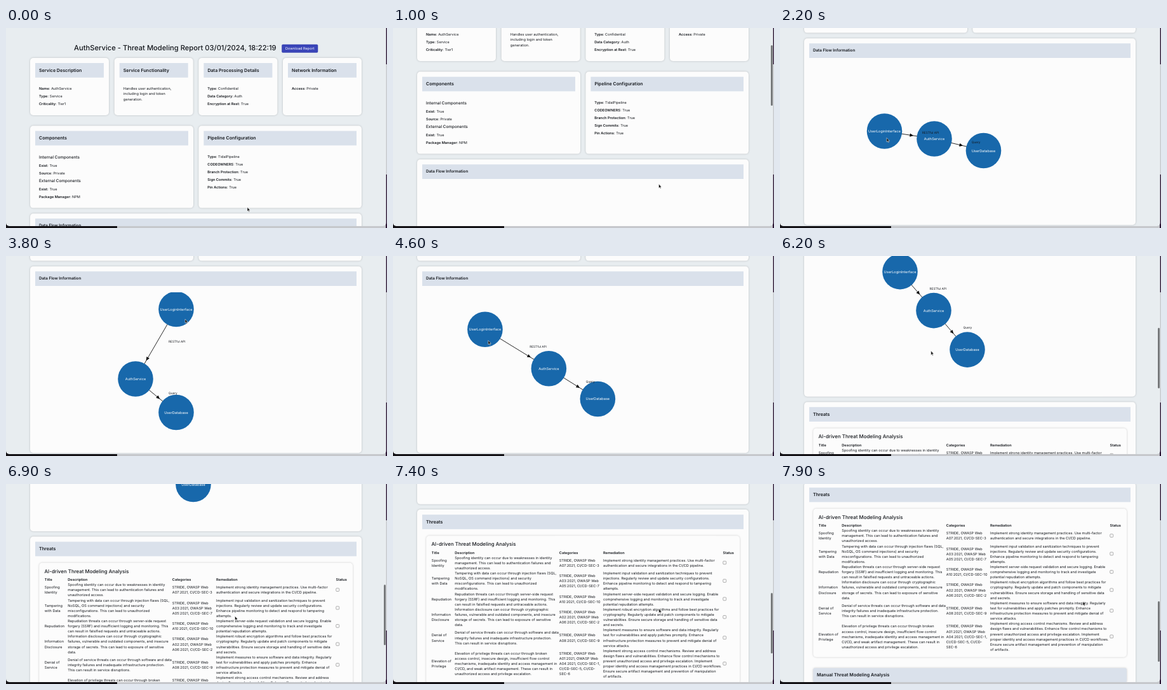
These frames come from a looping animation (600 by 314 pixels, 8 s). An HTML page:

```html
<!DOCTYPE html>
<html lang="en">
<head>
<meta charset="utf-8">
<title>Threat Modeling Report</title>
<style>
html, body { margin: 0; width: 100%; height: 100%; overflow: hidden; background: #e8edf0; }
svg { display: block; width: 600px; height: 314px; }
text { font-family: Inter, sans-serif; fill: #15181d; text-rendering: geometricPrecision; }
.card { fill: #fcfcfc; filter: drop-shadow(0 .8px 1.4px #0003); }
.bar { fill: #dae1eb; }
.node { fill: #1868ab; }
.box { fill: #fff; stroke: #777; stroke-width: .6; }
.mid { text-anchor: middle; fill: #fff; }
</style>
</head>
<body>
<svg viewBox="0 0 600 314">
  <clipPath id="window"><rect x="0" y="-20" width="598.6" height="331" rx="5"/></clipPath>
  <clipPath id="plot"><rect x="46" y="332" width="506" height="245"/></clipPath>
  <rect width="600" height="314" fill="#c6c8cc"/>
  <path d="M0 304H175V314H0Z" fill="#141216"/>
  <path d="M598 0H600V57H598ZM598 230H600V314H598Z" fill="#2c1634"/>
  <g clip-path="url(#window)">
    <rect width="600" height="314" fill="#e8edf0"/>
    <g id="page"><g id="report"></g><g id="graph" clip-path="url(#plot)"></g></g>
    <rect id="thumb" x="595" width="3" height="95" rx="1.5" fill="#777a7c"/>
  </g>
  <path id="cursor" d="M0 0V6.4L1.5 5.1L2.5 7.3L3.5 6.8L2.5 4.7H4.5Z" fill="#111" stroke="#fff" stroke-width=".5"/>
</svg>
<script>
const $ = id => document.getElementById(id);

// Text is placed by its left edge and the middle of its capitals.
const text = (x, y, str, size = 5.6, weight = 400, cls = '') =>
  `<text x="${x}" y="${y + size * .36}" font-size="${size}" font-weight="${weight}" class="${cls}">${str}</text>`;
const rect = (cls, x, y, w, h, r = 0) =>
  `<rect class="${cls}" x="${x}" y="${y}" width="${w}" height="${h}" rx="${r}"/>`;
const card = (x, y, w, h, title, size = 7.1) => rect('card', x, y, w, h, 5) +
  rect('bar', x + 8, y + 8, w - 16, 22.8) + text(x + 14, y + 19, title, size, 600);
const fields = (x, y, list) => list.map((s, i) =>
  text(x, y + i * 12, s.replace(/^[^:]+:/, '<tspan font-weight="600">$&</tspan>'))).join('');
const lines = (x, y, list, step = 8.12) => list.map((s, i) => text(x, y + i * step, s)).join('');

const threats = [
  ['Spoofing|Identity',
   'Spoofing identity can occur due to weaknesses in identity|management. This can lead to authentication failures and|unauthorized access.',
   'STRIDE, OWASP Web|A07:2021, CI/CD-SEC-3',
   'Implement strong identity management practices. Use multi-factor|authentication and secure integrations in the CI/CD pipeline.'],
  ['Tampering|with Data',
   'Tampering with data can occur through injection flaws (SQL,|NoSQL, OS command injections) and security|misconfigurations. This can lead to unauthorized|modifications.',
   'STRIDE, OWASP Web|A03:2021, OWASP Web|A05:2021, CI/CD-SEC-7',
   'Implement input validation and sanitization techniques to prevent|injections. Regularly review and update security configurations.|Enhance pipeline monitoring to detect and respond to tampering|attempts.'],
  ['Repudiation',
   'Repudiation threats can occur through server-side request|forgery (SSRF) and insufficient logging and monitoring. This|can result in falsified requests and untraceable actions.',
   'STRIDE, OWASP Web|A10:2021, CI/CD-SEC-10',
   'Implement server-side request validation and secure logging. Enable|comprehensive logging and monitoring to track and investigate|potential repudiation attempts.'],
  ['Information|Disclosure',
   'Information disclosure can occur through cryptographic|failures, vulnerable and outdated components, and insecure|storage of secrets. This can lead to exposure of sensitive|data.',
   'STRIDE, OWASP Web|A02:2021, OWASP Web|A06:2021, CI/CD-SEC-2',
   'Implement robust encryption algorithms and follow best practices for|cryptography. Regularly update and patch components to mitigate|vulnerabilities. Ensure secure storage and handling of sensitive data|and secrets.'],
  ['Denial of|Service',
   'Denial of service threats can occur through software and data|integrity failures and inadequate infrastructure protection.|This can result in service disruptions.',
   'STRIDE, OWASP Web|A08:2021, CI/CD-SEC-9',
   'Implement measures to ensure software and data integrity. Regularly|test for vulnerabilities and apply patches promptly. Enhance|infrastructure protection measures to prevent and mitigate denial of|service attacks.'],
  ['Elevation of|Privilege',
   'Elevation of privilege threats can occur through broken|access control, insecure design, insufficient flow control|mechanisms, inadequate identity and access management in|CI/CD, and weak artifact management. These can result in|unauthorized access and privilege escalation.',
   'STRIDE, OWASP Web|A01:2021, OWASP Web|A04:2021, CI/CD-SEC-1,|CI/CD-SEC-5, CI/CD-|SEC-6',
   'Implement strong access control mechanisms. Review and address|design flaws and vulnerabilities. Enhance flow control mechanisms to|prevent unauthorized access and privilege escalation. Implement|proper identity and access management practices in CI/CD workflows.|Ensure secure artifact management and prevention of manipulation|of artifacts.'],
];

function table() {
  const cols = [60.8, 97.3, 261.8, 331];
  let out = ['Title', 'Description', 'Categories', 'Remediation', 'Status']
    .map((s, i) => text(cols[i] ?? 519.5, 660, s, 5.6, 600)).join('');
  let top = 664.1;
  for (const row of threats) {
    const cells = row.map(s => s.split('|'));
    const height = 8.12 * Math.max(...cells.map(c => c.length));
    const mid = top + height / 2;
    cells.forEach((c, i) => out += lines(cols[i], mid - (c.length - 1) * 4.06, c));
    out += rect('box', 519.8, mid - 2.6, 4.8, 4.8, .9);
    top += height;
  }
  return out;
}

$('report').innerHTML =
  text(107, 30.5, 'AuthService - Threat Modeling Report 03/01/2024, 18:22:19', 11.2, 500) +
  '<rect x="434.5" y="26" width="56.5" height="12.5" rx="1.6" fill="#3a45b8" stroke="#2f3aa8" stroke-width=".5"/>' +
  text(462.8, 32.3, 'Download Report', 5.6, 400, 'mid') +
  card(38, 47, 124, 90, 'Service Description') +
  fields(52, 95.3, ['Name: AuthService', 'Type: Service', 'Criticality: Tier1']) +
  card(170.7, 47, 124, 90, 'Service Functionality') +
  lines(184.8, 95.3, ['Handles user authentication,', 'including login and token', 'generation.']) +
  card(303.4, 47, 124, 90, 'Data Processing Details') +
  fields(317.3, 95.3, ['Type: Confidential', 'Data Category: Auth', 'Encryption at Rest: True']) +
  card(436, 47, 124, 90, 'Network Information') +
  fields(450, 95.3, ['Access: Private']) +
  card(38, 153.6, 257, 129, 'Components') +
  text(52, 203, 'Internal Components', 6.4, 500) +
  fields(52, 215.5, ['Exist: True', 'Source: Private']) +
  text(52, 240, 'External Components', 6.4, 500) +
  fields(52, 253, ['Exist: True', 'Package Manager: NPM']) +
  card(303.4, 153.6, 256.6, 129, 'Pipeline Configuration') +
  fields(317.3, 202, ['Type: TidalPipeline', 'CODEOWNERS: True', 'Branch Protection: True', 'Sign Commits: True', 'Pin Actions: True']) +
  card(38, 291.2, 522, 293, 'Data Flow Information', 6.25) +
  card(38, 592.6, 522, 360, 'Threats') +
  rect('card', 52.3, 633.8, 493.7, 233, 5) +
  text(60.5, 647, 'AI-driven Threat Modeling Analysis', 7.9, 500) +
  table() +
  '<g class="card">' + rect('bar', 52.3, 884, 493.7, 22.8, 3) + '</g>' +
  text(58, 894.6, 'Manual Threat Modeling Analysis', 7.1, 600);

// Keys are [time, ...values], eased between neighbours.
function track(keys, t) {
  const i = keys.findIndex(k => k[0] > t);
  if (i < 1) return keys.at(i).slice(1);
  const a = keys[i - 1], b = keys[i];
  const p = (t - a[0]) / (b[0] - a[0]), e = p * p * (3 - 2 * p);
  return a.slice(1).map((v, j) => v + (b[j + 1] - v) * e);
}

const scroll = [[400, 0], [700, 85], [1000, 85], [1400, 275], [5700, 275], [6900, 510], [7900, 595]];
const pointer = [[400, 380, 281.5], [1000, 418.5, 245], [1600, 418, 245], [2200, 168, 172.5], [2500, 168, 172.5],
  [3800, 282, 99], [4400, 152, 134], [4900, 146, 130], [5500, 175.5, 114.5], [5800, 185, 124],
  [6900, 360.5, 207.5], [7900, 477, 184.5]];
// Centres of the three nodes: interface, service, database.
const layout = [
  [2400, 164.5, 162, 243, 174, 320.5, 192.5],
  [3800, 268, 83.5, 204, 193, 268, 245.5],
  [4400, 146, 117, 245, 176, 322, 222],
  [4900, 143, 112, 246, 178, 323, 229],
  [5500, 175.5, 98, 244.5, 181, 303, 243.5],
  [6100, 189, 113, 242, 174, 295, 235.5]];

const dy = 275;
function edge([x1, y1], [x2, y2]) {
  const turn = Math.atan2(y2 - y1, x2 - x1) * 180 / Math.PI;
  return `<path d="M${x1} ${y1}L${x2} ${y2}" stroke="#111" stroke-width=".9"/>` +
    `<path d="M-33.3 0l-5.6 -2.6v5.2z" fill="#000" transform="translate(${x2} ${y2}) rotate(${turn})"/>`;
}
const caption = (a, b, str) => text((a[0] + b[0]) / 2 + 20, (a[1] + b[1]) / 2 - 3.6, str, 4.75);

function drawGraph(t) {
  const v = track(layout, t);
  const nodes = [0, 2, 4].map(i => [v[i], v[i + 1] + dy]);
  const [ui, auth, db] = nodes;
  const names = ['UserLoginInterface', 'AuthService', 'UserDatabase'];
  $('graph').innerHTML = edge(ui, auth) + edge(auth, db) +
    nodes.map(([x, y], i) => `<circle class="node" cx="${x}" cy="${y}" r="27.8"/>` +
      text(x, y, names[i], 5.6, 400, 'mid')).join('') +
    caption(ui, auth, 'RESTful API') + caption(auth, db, 'Query');
}

function draw(now) {
  const t = Math.floor(now % 8000 / 100) * 100;
  const [s] = track(scroll, t);
  $('page').setAttribute('transform', `translate(0 ${-s})`);
  $('thumb').setAttribute('y', .8 + s * .308);
  $('thumb').style.opacity = t >= 500 && t < 1700 || t >= 5800 ? 1 : 0;
  $('cursor').setAttribute('transform', `translate(${track(pointer, t)})`);
  drawGraph(t);
}

const start = performance.now();
(function loop() {
  draw(performance.now() - start);
  requestAnimationFrame(loop);
})();
</script>
</body>
</html>
```
